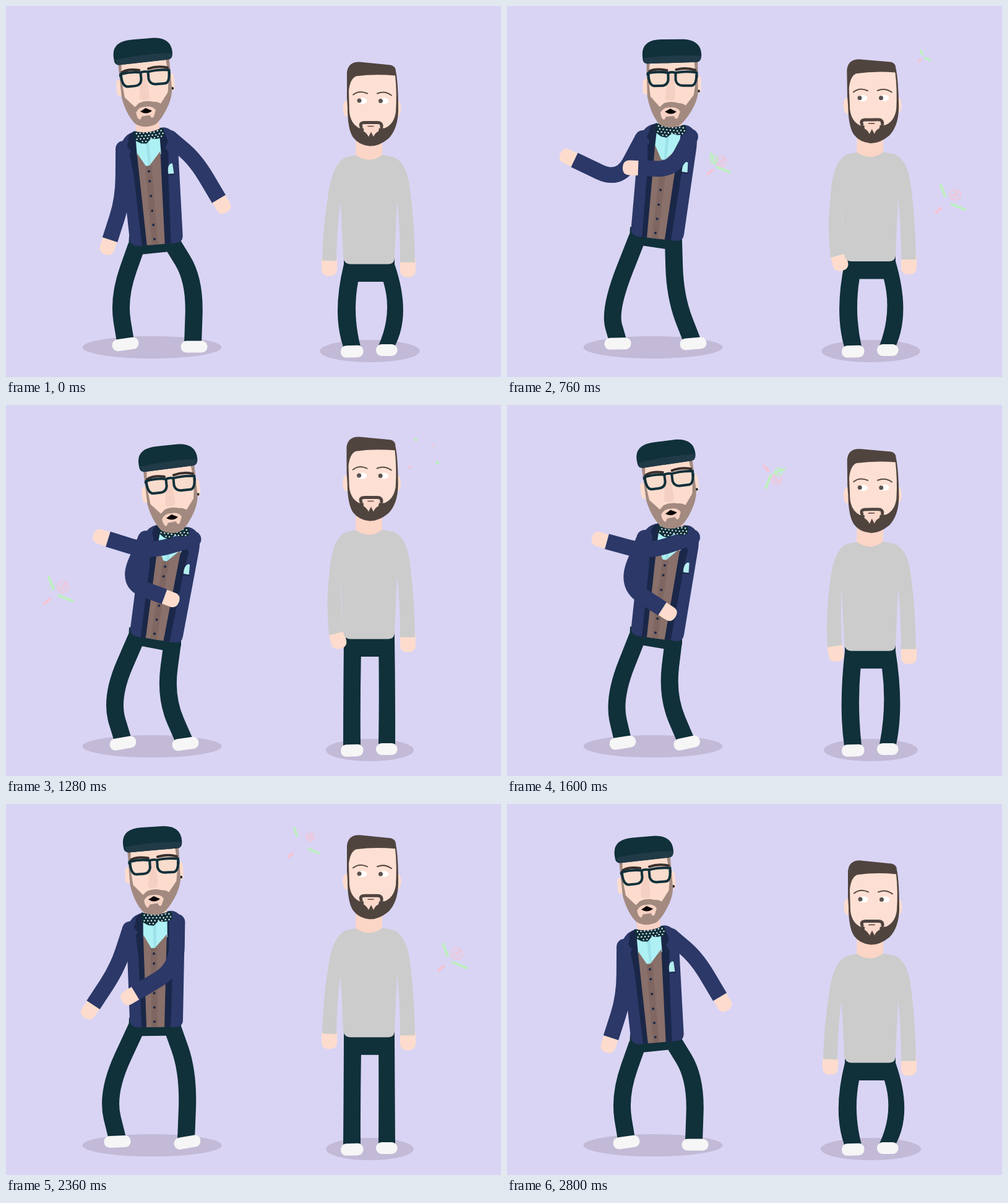
Recreate the animation shown at these times as an HTML page. Size 800 by 600 pixels, loop 2.84 s.

```html
<!DOCTYPE html>
<html lang="en">
<head>
<meta charset="utf-8">
<title>Two men dancing</title>
<style>
html, body { margin: 0; width: 100%; height: 100%; overflow: hidden; background: #d9d4f4; }
svg { display: block; width: 100vw; height: 100vh; }
.skin { fill: #fddccd; }
.pants { fill: #10303a; }
.leg { fill: none; stroke: #10303a; stroke-width: 28; }
.navy { fill: #2b3868; }
.sleeve { fill: none; stroke: #2b3868; stroke-width: 25.5; }
.shoe { fill: #f6f6f6; }
.beard { fill: #a38a80; }
.lapel { fill: #1b2748; }
.dark { fill: #50443f; }
.shirt { fill: #cccccc; }
.line { fill: none; stroke-linecap: round; }
</style>
</head>
<body>
<svg viewBox="0 0 800 600">
  <rect width="800" height="600" fill="#d9d4f4"/>
  <ellipse cx="236" cy="552" rx="112.5" ry="18" fill="#c2bad6"/>
  <ellipse id="shade" cx="588" cy="558" ry="18" fill="#c2bad6"/>
  <g id="confetti"></g>

  <g id="dancer">
    <path id="pelvis" class="pants"/>
    <path id="legL" class="leg"/>
    <path id="legR" class="leg"/>
    <rect id="shoeL" class="shoe" x="-21.5" y="-9.5" width="43" height="19" rx="9"/>
    <rect id="shoeR" class="shoe" x="-21.5" y="-9.5" width="43" height="19" rx="9"/>
    <g id="back"></g>
    <g id="torso">
      <path class="navy" d="M200 374Q198 300 196 240Q196 206 222 201L270 198Q290 202 290 232L286 374Q286 386 274 386H213Q201 386 200 374Z"/>
      <path class="lapel" d="M220 201Q210 206 211 216L208 224L214 232L211 238L215 270L219 386H266L271 270L274 238L269 231L275 222L272 211Q268 200 262 201Z"/>
      <path fill="#aef0f4" d="M223 208H262V240L238 264L223 240Z"/>
      <path fill="#9ce2e8" d="M239 215H244V258L240 262Z"/>
      <path fill="#89706a" d="M223 236L238 262L261 236L256 386H227Z"/>
      <path fill="#7f6661" d="M235 258H245V386H235Z"/>
      <g id="buttons" fill="#1c2947"></g>
      <path fill="#b4edf0" d="M271 274Q270 263 274 259Q277 256 279 258L280 274Z"/>
      <path stroke="#1b2748" stroke-width="2" d="M270 275H281"/>
    </g>
    <g id="front"></g>
    <path id="neck" stroke="#f8d3c5" stroke-width="38"/>
    <g id="scarf">
      <path class="pants" d="M221 200Q245 208 267 198Q272 204 269 212Q258 218 248 214L240 222L231 221L219 214Q224 210 220 206Z"/>
      <g id="dots" fill="#f1f6f6"></g>
    </g>
    <g id="head">
      <rect class="skin" x="201" y="121" width="12" height="26" rx="5"/>
      <rect class="skin" x="285" y="117" width="10" height="29" rx="5"/>
      <circle cx="291" cy="142" r="2.2" fill="#10232c"/>
      <path class="beard" d="M207 92H290L290 145Q288 160 279 174Q268 192 258 198Q240 204 226 194Q213 178 208 150Z"/>
      <path class="skin" d="M213 92H284L287 122L283 148L270 165Q265 161 258 161Q246 157 235 161L228 167L213 150L210 120Z"/>
      <path fill="#f4d0c2" d="M243 115H251L253 147Q254 158 245 157Q235 158 237 149Z"/>
      <path fill="#f7d2c3" d="M229 176Q234 167 245 168Q256 167 261 175L257 185Q253 189 251 182L238 183L235 188Q230 187 229 176Z"/>
      <path fill="#0a0505" d="M236 175L245 170L255 175Q246 182 236 175Z"/>
      <path class="line" stroke="#3a302e" stroke-width="4" d="M212 109Q222 104 240 108M255 107Q271 103 286 108"/>
      <g fill="#f8dccc" stroke="#10303a" stroke-width="4">
        <path d="M210 112Q226 109 242 112L242 124Q240 133 231 133H219Q210 132 210 112Z"/>
        <path d="M254 112Q270 109 288 112Q288 132 280 133H266Q256 133 254 124Z"/>
        <path fill="none" d="M240 113Q248 109 256 113M207 114H212M286 118H290"/>
      </g>
      <path class="pants" d="M201 88Q197 58 232 58H268Q296 60 296 84Q296 95 288 95L208 97Q201 96 201 88Z"/>
      <path fill="#213a47" d="M203 88Q250 82 295 85Q295 95 288 95L208 97Q204 96 203 88Z"/>
    </g>
  </g>

  <g id="watcher">
    <path id="trousers" class="pants"/>
    <rect class="shoe" x="541" y="549" width="36.5" height="19.5" rx="9" transform="rotate(-2 559 559)"/>
    <rect class="shoe" x="598" y="547" width="34.5" height="19" rx="9"/>
    <g id="upper">
      <path fill="#fbd5c6" d="M566 200H608V244Q588 260 565 244Z"/>
      <rect class="skin" id="palm" x="510" y="402" width="25" height="35" rx="10"/>
      <rect class="skin" x="637" y="402" width="25" height="37" rx="10"/>
      <path class="shirt" d="M566 242Q543 243 535 262L541 320L545 406Q546 418 557 418H617Q628 418 628 407L632 315L640 262Q632 244 608 241Q588 257 566 242Z"/>
      <path class="shirt" id="sleeve"/>
      <path class="shirt" d="M622 243Q648 250 653 298Q660 350 661 415H637Q637 360 632 315L615 300Z"/>
      <g id="face">
        <ellipse class="skin" cx="550" cy="166" rx="5.5" ry="13"/>
        <ellipse class="skin" cx="633" cy="166" rx="5.5" ry="13"/>
        <path class="dark" d="M551 150V108Q553 90 572 91L622 96Q630 98 630 106Q634 125 634 170Q633 200 618 215Q602 228 587 227Q570 225 561 213Q552 200 552 165Z"/>
        <path fill="#fde0d3" d="M554 138Q556 118 566 114Q596 110 629 113Q632 140 630 172Q627 192 612 198H571Q557 191 555 172Z"/>
        <path class="line dark" style="fill:none" stroke="#50443f" stroke-width="5" d="M574 196Q571 189 580 189L591 189L600 189Q608 189 607 196"/>
        <path fill="#fbd8ca" d="M578 193H604L602 203Q596 206 594 212L590 204L586 212Q583 206 578 203Z"/>
        <path class="line" stroke="#6b4a44" stroke-width="1.6" d="M585 195H594"/>
        <g class="line" stroke="#5b4a43" stroke-width="2"><path d="M561 144Q571 136 584 142M600 142Q612 137 623 145"/></g>
        <ellipse cx="576" cy="154" rx="7.5" ry="5" fill="#fff"/>
        <ellipse cx="611" cy="154" rx="7.5" ry="5" fill="#fff"/>
        <circle cx="571" cy="153.5" r="3.5" fill="#5a5250"/>
        <circle cx="605.5" cy="154" r="3.5" fill="#5a5250"/>
      </g>
    </g>
  </g>
</svg>
<script>
const LOOP = 2840, STEP = 40;
const TIMES = [0, 440, 760, 1280, 1960, 2360, 2800];
const $ = id => document.getElementById(id);
const set = (id, attrs) => { for (const k in attrs) $(id).setAttribute(k, attrs[k]); };
const mix = (a, b, k) => [a[0] + (b[0] - a[0]) * k, a[1] + (b[1] - a[1]) * k];

// Smooth track through the pose times, without overshoot.
function track(...v) {
  v.push(v[0]);
  const n = v.length - 1;
  const slope = i => (v[i + 1] - v[i]) / (TIMES[i + 1] - TIMES[i]);
  const m = v.map((_, i) => {
    if (i === 0 || i === n) return 0;
    const a = slope(i - 1), b = slope(i);
    return a * b <= 0 ? 0 : 2 * a * b / (a + b);
  });
  return t => {
    if (t >= TIMES[n]) return v[n];
    let i = 0;
    while (t >= TIMES[i + 1]) i++;
    const h = TIMES[i + 1] - TIMES[i], u = (t - TIMES[i]) / h, w = 1 - u;
    return v[i] * (1 + 2 * u) * w * w + m[i] * h * u * w * w
      + v[i + 1] * u * u * (3 - 2 * u) - m[i + 1] * h * u * u * w;
  };
}

const pose = {
  hip: track(377, 377, 367, 370, 364, 352),
  lean: track(-4.7, 0, 6.6, 9, 4.8, -0.5),
  headX: track(226, 245, 264, 268, 257, 239),
  headY: track(170, 175, 171, 182, 162, 154),
  tilt: track(-5, 0, -0.5, -6, -7.5, -3.5),
  sway: track(0, 6, 15, 14, 2, 0),
  nod: track(0, -1, -0.8, -0.3, -1, 0)
};
const legs = {
  L: {
    kneeX: track(187, 184, 173, 177, 180, 171), kneeY: track(470, 480, 482, 470, 470, 463),
    x: track(193, 187, 179, 189, 183, 180), y: track(547, 546, 546, 547, 545, 546),
    turn: track(-8, 0, -1, -10, -6, -2), ankle: 0
  },
  R: {
    kneeX: track(300, 291, 275, 263, 267, 291), kneeY: track(450, 470, 468, 470, 462, 440),
    x: track(304, 298, 301, 290, 292, 293), y: track(551, 548, 546, 548, 545, 547),
    turn: track(0, -1, -5, -8, -15, -10), ankle: -2
  }
};
const arms = {
  L: {
    at: [-38, -150], front: x => x > 190,
    elbowX: track(187, 200, 178, 206, 193, 178), elbowY: track(310, 316, 272, 282, 290, 265),
    cuffX: track(168, 246, 109, 256, 236, 141), cuffY: track(378, 329, 249, 310, 340, 325)
  },
  R: {
    at: [38, -161], front: x => x < 285,
    elbowX: track(306, 309, 265, 232, 225, 268), elbowY: track(252, 258, 258, 233, 236, 262),
    cuffX: track(344, 316, 212, 165, 160, 209), cuffY: track(312, 285, 262, 217, 232, 306)
  }
};

// Limb from a to b whose rounded bend passes through k.
function limb(a, k, b, r) {
  const c = [0, 1].map(i => (k[i] - r / 4 * (a[i] + b[i])) / (1 - r / 2));
  const p = mix(c, a, r), q = mix(c, b, r);
  return { d: `M${a}L${p}Q${c} ${q}L${b}`, angle: Math.atan2(b[1] - c[1], b[0] - c[0]) * 180 / Math.PI };
}

const armParts = {};
for (const s of 'LR') {
  const g = document.createElementNS('http://www.w3.org/2000/svg', 'g');
  g.innerHTML = '<path class="skin" d="M-5 -12H14Q25 -12 25 0Q25 12 14 12H-5Z"/>'
    + '<path class="sleeve"/><circle class="navy" r="12.7"/>';
  armParts[s] = g;
}
$('buttons').innerHTML = [267, 283, 307, 331, 354, 377]
  .map(y => `<circle cx="240" cy="${y}" r="2"/>`).join('');
let dots = '';
for (let row = 0; row < 4; row++)
  for (let i = 0; i < (row < 3 ? 8 : 2); i++)
    dots += `<circle cx="${225 + i * 5.7 + row % 2 * 2.6 + (row > 2 ? 6 : 0)}" cy="${204.5 + row * 4.6 - (i > 5 ? 1.5 : 0)}" r="1.2"/>`;
$('dots').innerHTML = dots;

function drawDancer(t) {
  const p = {};
  for (const k in pose) p[k] = pose[k](t);
  const a = p.lean * Math.PI / 180, c = Math.cos(a), s = Math.sin(a);
  const place = ([x, y]) => [240 + x * c - y * s, p.hip + x * s + y * c];
  const frame = `translate(240 ${p.hip}) rotate(${p.lean}) translate(-240 -377)`;
  set('torso', { transform: frame });
  set('scarf', { transform: frame });
  set('head', { transform: `translate(${p.headX} ${p.headY}) rotate(${p.tilt}) translate(-245 -175)` });
  set('neck', { d: `M${place([4, -168])}L${p.headX} ${p.headY}` });

  const hips = { L: [211, p.hip + 9 - p.lean * 0.4], R: [269, p.hip + 10 + p.lean * 0.5] };
  const [lx, ly] = hips.L, [rx, ry] = hips.R;
  set('pelvis', { d: `M${lx - 12} ${ly - 16}L${rx + 14} ${ry - 16}V${ry + 5}L${rx - 10} ${ry + 13}L${lx + 6} ${ly + 14}L${lx - 13} ${ly + 4}Z` });
  for (const k in legs) {
    const g = legs[k], x = g.x(t), y = g.y(t);
    set('leg' + k, { d: limb(hips[k], [g.kneeX(t), g.kneeY(t)], [x + g.ankle, y - 5], 0.55).d });
    set('shoe' + k, { transform: `translate(${x} ${y}) rotate(${g.turn(t)})` });
  }
  for (const k in arms) {
    const g = arms[k], from = place(g.at), cuff = [g.cuffX(t), g.cuffY(t)];
    const arm = limb(from, [g.elbowX(t), g.elbowY(t)], cuff, 0.45);
    const [hand, sleeve, cap] = armParts[k].children;
    hand.setAttribute('transform', `translate(${cuff}) rotate(${arm.angle})`);
    sleeve.setAttribute('d', arm.d);
    cap.setAttribute('transform', `translate(${from})`);
    $(g.front(cuff[0]) ? 'front' : 'back').append(armParts[k]);
  }
}

function drawWatcher(t) {
  const wave = Math.cos((t / LOOP * 3 - 22.2 / 23.67) * 2 * Math.PI);
  const low = (1 + wave * (1.2 - 0.2 * wave * wave)) / 2;
  const hem = 376.5 + 42 * low, s = pose.sway(t);
  const mid = (hem + 549) / 2 + 14, top = hem - 12, crotch = hem + 28.5;
  set('shade', { rx: 70.5 + 10.5 * low });
  set('upper', { transform: `translate(0 ${hem - 418})` });
  set('face', { transform: `rotate(${pose.nod(t)} 588 225)` });
  set('sleeve', { d: `M552 244Q527 252 ${520 + s * 0.2} 310Q${512 + s * 0.3} 360 ${511 + s * 0.8} 412L${534 + s * 0.8} ${413 - s * 0.5}Q${535 + s * 0.4} 350 541 318L558 300Z` });
  set('palm', { transform: `translate(${s * 0.85} ${-s * 0.2}) rotate(${-s} 522 412)` });
  set('trousers', { d: `M546 ${top}V${hem}Q${546 - 20 * low} ${mid} 545 551H573Q${573 - 14 * low} ${mid} ${574 - 5 * low} ${crotch}H${602 + 8 * low}Q${602 + 24 * low} ${mid} 602 549H629Q${628 + 28 * low} ${mid} 628 ${hem}V${top}Z` });
}

const GREEN = '#bdf0bf', PINK = '#f6c3d2', LIFE = 600;
// x, y, start, turn
const bursts = [
  [428, 86, 130, 0], [712, 318, 390, 0], [338, 260, 560, 0], [673, 83, 700, 0],
  [80, 306, 940, 0], [427, 112, 1400, 90], [103, 153, 1760, 0], [477, 68, 1900, 0], [717, 254, 2020, 0]
];
const sticks = [[-11, -28, 20, GREEN], [-21, 18, 12, PINK], [25, 10, 25, GREEN]];

function burst([x, y, start, turn], t) {
  const a = (t - start) / LIFE;
  if (a <= 0 || a >= 1) return '';
  const out = 0.2 + 0.8 * a, size = Math.sin(Math.PI * a);
  let s = `<g class="line" stroke-width="4" transform="translate(${x} ${y}) rotate(${turn})">`;
  for (const [dx, dy, len, color] of sticks) {
    const k = len * size / 2 / Math.hypot(dx, dy);
    s += `<path stroke="${color}" d="M${dx * (out - k)} ${dy * (out - k)}L${dx * (out + k)} ${dy * (out + k)}"/>`;
  }
  if (a > 0.25) {
    const r = 9 * size;
    s += `<g stroke="${PINK}" stroke-width="2.2" opacity=".8" transform="translate(${18 * out} ${-18 * out})">`
      + `<circle r="${r}"/><path d="M${-r * 0.6} ${r * 0.3}L${r * 0.4} ${-r * 0.5}L${r * 0.1} ${r * 0.5}"/></g>`;
  }
  if (a > 0.2 && a < 0.6)
    s += `<circle cx="-4" cy="-12" r="6" stroke="${GREEN}" stroke-width="2" opacity="${Math.min(1, (0.6 - a) * 5)}"/>`;
  return s + '</g>';
}

function draw() {
  const t = Math.floor(performance.now() % LOOP / STEP) * STEP;
  drawDancer(t);
  drawWatcher(t);
  $('confetti').innerHTML = bursts.map(b => burst(b, t)).join('');
  requestAnimationFrame(draw);
}
draw();
</script>
</body>
</html>
```
